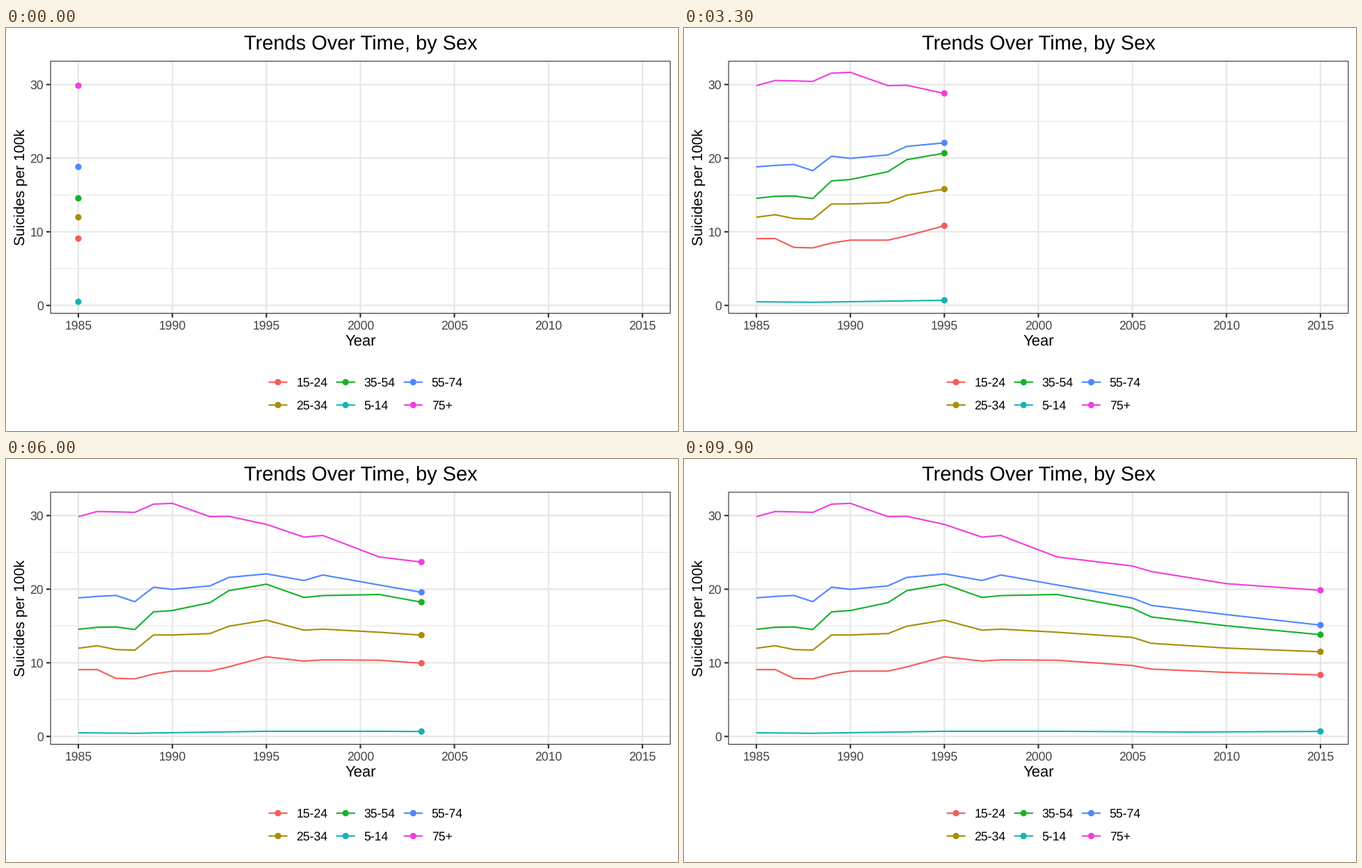
These frames come from a looping animation (966 by 580 pixels, 10 s). A matplotlib script:

```python
import numpy as np
import matplotlib.pyplot as plt
from matplotlib.animation import FuncAnimation
from matplotlib.patches import Circle, Rectangle

W, H, DPI = 966, 580, 100
FRAMES, SPAN = 100, 30
PT = 72 / DPI  # points per pixel
GRID, DARK, TICK_TEXT = "#e6e6e6", "#2b2b2b", "#424242"
LEFT, RIGHT, TOP, BOTTOM = 63.6, 955.4, 47.3, 411.1

# Years since 1985 at which the curves bend; straight in between.
BENDS = [0, 1, 2, 3, 4, 5, 7, 8, 10, 12, 13, 16, 20, 21, 25, 30]

plt.rcParams.update({"font.family": "Liberation Sans", "text.hinting": "none"})
fig = plt.figure(figsize=(W / DPI, H / DPI), dpi=DPI, facecolor="white")
ax = fig.add_axes([0, 0, 1, 1])
ax.set(xlim=(0, W), ylim=(H, 0))
ax.axis("off")


def px(year):
    return 104 + 27.03 * np.asarray(year)


def py(rate):
    return 399.3 - 10.597 * np.asarray(rate)


def stroke(x, y, color, width, z=1):
    line, = ax.plot(x, y, color=color, lw=width * PT, zorder=z, snap=False,
                    solid_capstyle="butt", solid_joinstyle="round")
    return line


def dot(x, y, color):
    return ax.add_patch(Circle((x, y), 4.6, fc=color, lw=0, zorder=4,
                               snap=False))


def label(x, y, text, size, color="black", ha="center", rotation=0):
    ax.text(x, y, text, fontsize=size * PT, color=color, ha=ha,
            va="baseline", rotation=rotation, rotation_mode="anchor")


def draw_panel():
    for rate in (5, 15, 25):
        stroke([LEFT, RIGHT], [py(rate)] * 2, GRID, 1.07)
    for rate in (0, 10, 20, 30):
        y = py(rate)
        stroke([LEFT, RIGHT], [y, y], GRID, 2.13)
        stroke([LEFT - 5.5, LEFT], [y, y], DARK, 2.13)
        label(54, y + 6.2, str(rate), 17.6, TICK_TEXT, "right")
    for year in range(0, SPAN + 1, 5):
        x = px(year)
        stroke([x, x], [TOP, BOTTOM], GRID, 2.13)
        stroke([x, x], [BOTTOM, BOTTOM + 5.5], DARK, 2.13)
        label(x, 433.5, str(1985 + year), 17.6, TICK_TEXT)
    ax.add_patch(Rectangle((LEFT + .5, TOP + .5), RIGHT - LEFT - 1,
                           BOTTOM - TOP - 1, fill=False, ec=DARK,
                           lw=1.1 * PT, zorder=5, snap=False))
    label(509.5, 31, "Trends Over Time, by Sex", 29)
    label(509.5, 457, "Year", 22)
    label(27, 229.3, "Suicides per 100k", 21.2, rotation=90)


class Series:
    def __init__(self, name, color, col, row, rates, bends=BENDS):
        self.bends, self.rates = bends, rates
        self.line = stroke([], [], color, 2.13, 3)
        self.head = dot(px(0), py(rates[0]), color)
        x, y = 391 + 97.2 * col, 509.7 + 32.9 * row
        stroke([x - 13.6, x + 13.6], [y, y], color, 2.13, 3)
        dot(x, y, color)
        label(x + 26.3, y + 6.4, name, 17.6, ha="left")

    def reveal(self, t):
        years = np.append(np.arange(np.ceil(t)), t)
        x, y = px(years), py(np.interp(years, self.bends, self.rates))
        self.line.set_data(x, y)
        self.head.center = x[-1], y[-1]
        return self.line, self.head


draw_panel()

series = [
    Series("15-24", "#f35e5a", 0, 0,
           [9.08, 9.08, 7.88, 7.82, 8.48, 8.87, 8.87, 9.45,
            10.82, 10.23, 10.4, 10.35, 9.63, 9.15, 8.7, 8.35]),
    Series("25-34", "#a88e08", 0, 1,
           [11.98, 12.32, 11.8, 11.72, 13.78, 13.78, 13.97, 14.97,
            15.8, 14.43, 14.58, 14.15, 13.45, 12.65, 12, 11.5]),
    Series("35-54", "#17b12b", 1, 0,
           [14.55, 14.82, 14.87, 14.52, 16.92, 17.1, 18.17, 19.8,
            20.68, 18.87, 19.13, 19.28, 17.42, 16.23, 15.03, 13.82]),
    Series("5-14", "#17b3b7", 1, 1,
           [.5, .43, .7, .7, .6, .68], bends=[0, 3, 10, 16, 23, 30]),
    Series("55-74", "#5086ff", 2, 0,
           [18.82, 19.02, 19.15, 18.3, 20.27, 19.98, 20.45, 21.6,
            22.08, 21.18, 21.93, 20.57, 18.8, 17.8, 16.55, 15.12]),
    Series("75+", "#f03fdd", 2, 1,
           [29.85, 30.55, 30.5, 30.43, 31.55, 31.66, 29.85, 29.9,
            28.8, 27.07, 27.3, 24.37, 23.15, 22.4, 20.75, 19.85]),
]

# Each year lands on a whole frame; the reveal is linear in between.
year_frames = np.rint(np.arange(SPAN + 1) * (FRAMES - 1) / SPAN)


def update(frame):
    t = np.interp(frame, year_frames, np.arange(SPAN + 1))
    return [artist for s in series for artist in s.reveal(t)]


anim = FuncAnimation(fig, update, frames=FRAMES, interval=100,
                     init_func=lambda: update(0), repeat=True,
                     repeat_delay=0, blit=False)
plt.show()
```
